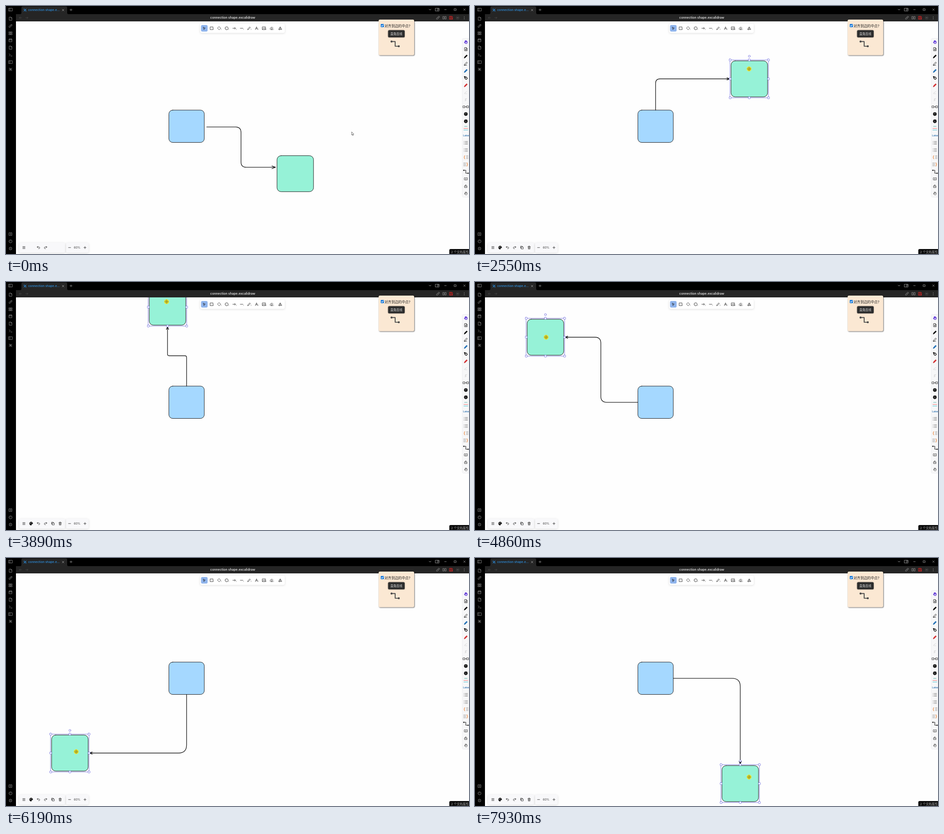
Recreate the animation shown at these times as an HTML page. Size 1022 by 548 pixels, loop 8 s.

```html
<!DOCTYPE html>
<html lang="zh">
<head>
<meta charset="utf-8">
<title>Connection shape</title>
<style>
html, body { margin: 0; width: 100%; height: 100%; overflow: hidden; background: #fefefe; }
svg { display: block; width: 1022px; height: 548px; }
text { font-family: Inter, "Noto Sans CJK SC", "Noto Sans CJK", sans-serif; }
.float { filter: drop-shadow(0 1px 2px #0002); }
</style>
</head>
<body>
<svg viewBox="0 0 1022 548" fill="none" stroke-linecap="round" stroke-linejoin="round">
  <rect width="1022" height="548" fill="#fefefe"/>
  <rect x="359.5" y="230" width="78.2" height="71.5" rx="8.5" fill="#a5d8ff" stroke="#1e1e1e"/>
  <rect id="target" x="-40.3" y="-39.8" width="80.6" height="79.6" rx="9" fill="#96f2d7" stroke="#1e1e1e"/>
  <path id="arrow" stroke="#1e1e1e" stroke-width="1.35"/>
  <g id="selection" stroke="#6965db" stroke-width=".8"></g>
  <g id="grab">
    <circle r="5.4" fill="#e9e63a"/>
    <path d="M0-4L4 0 0 4-4 0ZM-2-2 2 2M2-2-2 2M0-3V3M-3 0H3" stroke="#8f8c22" stroke-width=".8"/>
  </g>
  <path id="pointer" d="M0 0V6.6L1.5 5.3 2.5 7.7 3.6 7.2 2.6 4.9 4.5 4.7Z" fill="#fff" stroke="#333" stroke-width=".7"/>
  <g id="ui"></g>
  <g id="extras"></g>
</svg>
<script>
const $ = id => document.getElementById(id);
const box = (x, y, w, h, fill, r = 0, more = '') =>
  `<rect x="${x}" y="${y}" width="${w}" height="${h}" rx="${r}" fill="${fill}" ${more}/>`;
const icon = (x, y, d, color = '#333', width = .9, fill = 'none') =>
  `<path transform="translate(${x} ${y})" d="${d}" stroke="${color}" stroke-width="${width}" fill="${fill}"/>`;
const label = (x, y, size, fill, text, more = '') =>
  `<text x="${x}" y="${y}" font-size="${size}" fill="${fill}" ${more}>${text}</text>`;
const row = (list, draw) => list.map(draw).join('');

const D = {
  circle: 'M-3.4 0A3.4 3.4 0 1 1 3.4 0 3.4 3.4 0 1 1-3.4 0',
  square: 'M-3-3H3V3H-3Z',
  panel: 'M-4-3H4V3H-4ZM-1.5-3V3',
  doc: 'M-2.5-3.5H1L3-1.5V3.5H-2.5ZM1-3.5V-1.5H3',
  grid: 'M-3.2-3H-.6V-.5H-3.2ZM.8-3H3.4V-.5H.8ZM-3.2 1H-.6V3.5H-3.2ZM.8 1H3.4V3.5H.8Z',
  cross: 'M-2-2 2 2M2-2-2 2',
  plus: 'M-2.5 0H2.5M0-2.5V2.5',
  minus: 'M-2.5 0H2.5',
  menu: 'M-2.6-2.2H2.6M-2.6 0H2.6M-2.6 2.2H2.6',
  pen: 'M-3.5 3.5L-2.7 1 1.8-3.4 3.4-1.8-1 2.7Z',
  undo: 'M-1.2-3L-3-1.2-1.2.6M-3-1.2H1A1.8 1.8 0 0 1 1 2.4H0',
  redo: 'M1.2-3L3-1.2 1.2.6M3-1.2H-1A1.8 1.8 0 0 0-1 2.4H0',
  link: 'M-.6.6L1.4-1.4M-1-1L-3 1A1.4 1.4 0 0 0-1 3L.6 1.4M1 1L3-1A1.4 1.4 0 0 0 1-3L-.6-1.4',
  hand: 'M-1.5 1V-2.4M0 0V-3.2M1.5 0V-2.5M3-.8V1.4Q2.6 3.6.6 3.6-1.4 3.4-3.2.6L-1.5 1',
  gear: 'M0-3.2 1-2.4 2.3-2.5 2.4-1 3.3 0 2.4 1 2.3 2.4 1 2.4 0 3.3-1 2.4-2.4 2.4-2.4 1-3.3 0-2.4-1-2.4-2.4-1-2.4Z',
  list: 'M-1.5-3H4M-1.5 0H4M-1.5 3H4M-4-3h.5M-4 0h.5M-4 3h.5',
  spark: 'M-3-3 3 3M3-3-3 3M-3-1 1 3M-1-3 3 1'
};

const frame = () =>
  box(0, 0, 1022, 18, '#000') + box(0, 0, 22, 548, '#000') + box(22, 18, 1000, 16, '#252525') +
  '<path d="M31 18Q34 18 34 15V4Q34 1 37 1H132Q135 1 135 4V15Q135 18 138 18Z" fill="#252525"/>' +
  icon(42, 9, D.spark, '#2c86cf', .9) +
  label(49, 11.3, 6.65, '#2c86cf', 'connection shape.e...', 'font-weight="600"') +
  label(500.5, 28.3, 7, '#dcdcdc', 'connection shape.excalidraw', 'font-weight="600" text-anchor="middle"') +
  icon(126, 9, D.cross, '#bbb', .7) + icon(143.5, 8.5, D.plus, '#aaa', .7) +
  icon(10, 8, D.panel, '#999', .8) +
  icon(32, 26, 'M2.5 0H-2.5M-.5-2-2.5 0-.5 2', '#444') + icon(46, 26, 'M-2.5 0H2.5M.5-2 2.5 0 .5 2', '#444') +
  icon(936, 8, 'M-2-1 0 1 2-1', '#aaa') + icon(952, 8, 'M-4-3H4V3H-4ZM1-3V3M1-1H4', '#aaa', .8) +
  icon(970, 8, 'M-2 0H2', '#aaa', .8) + icon(991.5, 8, 'M-2-2H2V2H-2Z', '#aaa', .8) + icon(1012, 8, D.cross, '#aaa', .7) +
  icon(953.5, 26, D.link, '#999', .8) +
  icon(968, 26, 'M-3.5-2.8H-1V2.8H-3.5ZM1-2.8H3.5V2.8H1Z', '#999', .8) +
  icon(982.5, 26, 'M-3.2-3.2H2L3.2-2V3.2H-3.2ZM-1.5-3V-1H1.5V-3M-2 3V1H2V3', '#c22', 1) +
  icon(997, 26, D.circle, '#444', .8) + icon(997, 26, 'M-1 0H1', '#555', 2) +
  icon(1011.5, 26, 'M0-2.5V-2.4M0 0V.1M0 2.5V2.6', '#bbb', 1.2) +
  row([['doc', 28], ['link', 44], ['grid', 60], ['square', 76], ['doc', 92], [0, 108], ['panel', 124], ['spark', 140],
       ['square', 504], ['circle', 520], ['gear', 536]],
    ([k, y]) => icon(10, y, k ? D[k] : 'M-3-2.5-.5 0-3 2.5M.5 2.5H3.5', '#929292', .8)) +
  icon(10, 76, 'M-3-1.2H3M-1.5-4V-3M1.5-4V-3', '#929292', .8) +
  label(8.6, 506, 5, '#929292', '8') + label(8.6, 521.9, 5, '#929292', '?') + icon(10, 536, 'M-.8 0H.8', '#929292', 1);

const toolShapes = ['M-1.8-2.4 2.4-.3.4.4-.3 2.6Z', D.square, 'M0-3.5L3.5 0 0 3.5-3.5 0Z', D.circle,
  'M-3 0H3M1-2 3 0 1 2', 'M-3 0H3', 'M-3 3L-2.3.8 1.6-3 3-1.6-.8 2.3Z', 'M-2.6 3L-.2-3H.2L2.6 3M-1.6.8H1.6',
  'M-3.4-3H3.4V3H-3.4ZM-3 2L-.8-.4 1 1.4 2 .5 3.2 1.8M1.4-1.2h.1', 'M-3.2 1L.8-3 3.2-.6-.4 3H-1.4ZM-.4 3H3M-1.2-1 1.2 1.4',
  'M0-3L1.5-.6H-1.5ZM-3 1H-.6V3.2H-3ZM.8 2A1.2 1.2 0 1 1 3.2 2 1.2 1.2 0 1 1 .8 2'];
const toolbar = () =>
  box(428.5, 39, 187, 20.5, '#fff', 4, 'class="float"') + box(430.5, 42, 14.5, 14.5, '#8fb4ec', 3) +
  row(toolShapes, (d, i) => {
    const x = i < 10 ? 437.5 + 16.5 * i : 605.5;
    const mark = i && i < 10 ? label(x + 3.4, 53, 3.2, '#777', i % 10) : '';
    return icon(x, 49.2, d, '#262626', .85) + mark;
  });

const note = () =>
  box(822.5, 30, 78.5, 78.7, '#fbe8d3', 3, 'style="filter:drop-shadow(1px 1px 1.2px #0009)"') +
  box(827.2, 39.8, 7, 7, '#0b74dc', 1.2) + icon(830.7, 43.4, 'M-2 0-.6 1.5 2-1.6', '#fff', 1.1) +
  label(835.5, 46.8, 7.6, '#222', '对齐到边的中点?') +
  box(843.5, 53.5, 36.5, 15.8, '#2d2d2d', 2.6, 'style="filter:drop-shadow(0 .5px .8px #0008)"') +
  label(861.6, 64, 6.6, '#dcdcdc', '直角连线', 'text-anchor="middle"') +
  icon(859, 83.7, 'M-8-5.2H0V5.2H8', '#4a4a4a', 1.9) +
  '<circle cx="851" cy="78.5" r="2.2" fill="#4a4a4a"/><circle cx="867" cy="88.9" r="2.2" fill="#4a4a4a"/>';

const brace = 'M-2-3.5Q-3.5-3.5-3.2-1.6-3 0-4 0-3 0-3.2 1.6-3.5 3.5-2 3.5';
const sideIcons = [
  [D.hand, '#6741d9', 1.5], [D.doc + 'M-1.2 1H1.6M.2-.4V2.4', '#222', .9], [D.pen, '#111', 1, '#111'],
  [D.pen + 'M-3.5 3.8H2', '#222', .9], [D.pen, '#2571b5', 1, '#2571b5'],
  ['M-3.5-3.5 1.5-2 3.5 1 1 3.3-2 1.5ZM-3.5-3.5 0 0M1 3.3 3.5 1', '#111', 1.2],
  [D.pen, '#c2242b', .8, '#d33'], ['M-3 3L-2 1 2-2M-1 3H2', '#ccc', .8], ['M2-2Q-3-2-1 0 3 2-2 2.5', '#bbb', .8],
  ['M-6-2H-2V2H-6ZM2-2H6V2H2ZM-2 0H2', '#333', .9], [D.gear + 'M-1 0H1', '#111', 2], [D.gear + 'M-1 0H1', '#111', 2],
  ['M-4.5 0H4.5', '#e66', .9], null, [D.list, '#666', .9], [D.list, '#777', .9],
  [brace, '#e8833a', 1.1], ['M2-3.5Q3.5-3.5 3.2-1.6 3 0 4 0 3 0 3.2 1.6 3.5 3.5 2 3.5', '#e8833a', 1.1],
  ['M-5-3H0V3.5H5', '#222', 1.1], ['M0-1.8Q-2-3-3.5-2.3V2.3Q-2 1.7 0 2.7 2 1.7 3.5 2.3V-2.3Q2-3 0-1.8V2.7', '#333', .8],
  ['M-2.5-.3H2.5V3.3H-2.5ZM-1.4-.3V-2Q0-4.4 1.4-2M0 1.3h.1', '#333', .9], [D.hand, '#333', .8]];
const sidePanel = () =>
  box(1007, 71.5, 20, 351, '#f7f7f8', 3, 'stroke="#ececf0" stroke-width=".8"') +
  row(sideIcons, (s, i) => s ? icon(1015, 79.5 + 15.92 * i, ...s) : label(1009, 288.4, 5.2, '#2b6fae', 'Latex', 'font-weight="600"')) +
  icon(1015, 270, 'M-3-4H3', '#4a9', .9) + icon(1015, 270, 'M-4.5 4H4.5', '#29b6c9', .9) +
  icon(1017, 334, 'M-1-3H3M-1 0H3M-1 3H3', '#777', .8) + icon(1013, 350, 'M-3-3H2M-3 0H2M-3 3H2', '#777', .8) +
  '<circle cx="1010.5" cy="363.1" r="1.4" fill="#222"/><circle cx="1020" cy="369.6" r="1.4" fill="#222"/>';

const footer = () =>
  box(28.5, 523, 102.5, 22, '#f8f8fa', 4, 'class="float"') + box(132.5, 523, 50, 22, '#f8f8fa', 4, 'class="float"') +
  row([['menu', 39.5], ['undo', 71.7], ['redo', 87.3], ['minus', 140.3], ['plus', 174.3]],
    ([k, x]) => icon(x, 533.8, D[k], '#333', .9)) +
  label(157, 536.2, 6.6, '#444', '60%', 'text-anchor="middle"') +
  '<path d="M978.5 548V540Q978.5 537 981.5 537H1022V548Z" fill="#0a0a0a"/>' +
  label(982.5, 545.6, 6.6, '#aaa', '2 个文档属性');

$('ui').innerHTML = frame() + toolbar() + note() + sidePanel() + footer();
$('extras').innerHTML =
  icon(55.5, 533.8, 'M0-3.6A3.6 3.6 0 0 0 0 3.6Q1.4 3.4.6 1.8.6.8 2 .9 3.6 1 3.6-.4 3.2-3.4 0-3.6Z', '#111', .8, '#111') +
  icon(55.5, 533.8, 'M-1.9-.2V-.1M-.8-1.9V-1.8M1.4-1.8V-1.7', '#fff', 1.1) +
  icon(103.5, 533.8, 'M-1.2-1.2H3V3H-1.2ZM-1.2 1H-3V-3H1V-1.2', '#333', .9) +
  icon(119.5, 533.8, 'M-2.8-2H2.8M-2.2-2-1.8 3.3H1.8L2.2-2M-1-2V-3.3H1V-2M-.7-.4V1.8M.7-.4V1.8', '#333', .8);
$('selection').innerHTML = box(-42.3, -41.8, 84.6, 83.6, 'none') +
  row([-1, 0, 1], i => row([-1, 0, 1], j => i || j
    ? box(i * 42.3 - 2.2, j * 41.8 - 2.2, 4.4, 4.4, '#fff', 1) : '')) +
  '<circle cy="-50" r="2.2" fill="#fff"/>';

// Drag keys: step, centre x and y, hand offset x and y.
const keys = [
  [0, 638.5, 370.5, 0, -10], [4, 640, 362, 0, -12], [8, 645.5, 321, 0, -20], [15, 605.5, 161, -.5, -22],
  [17, 574.5, 132, -5, -18], [26, 422.5, 50, -8, -12], [29, 356.5, 55.5, -2, -12], [35, 220.5, 76, -5, -4],
  [39, 155.5, 122, 1.5, 0], [44, 126, 238, 5, 2], [53, 141, 431, 14, -3], [62, 303.5, 497, 25.5, -11],
  [66, 430, 508, 26, -14], [71, 585.5, 498.5, 19.5, -14.5]];
const bursts = [1120, 1990, 2840, 3700, 4580, 5430, 6280, 7150];

function stepAt(t) {
  const i = bursts.findLastIndex(s => t >= s);
  return i * 9 + Math.min(8, Math.floor((t - bursts[i]) / (i ? 93.2 : 97.2)));
}

function pose(n) {
  const i = Math.max(0, Math.min(keys.length - 2, keys.findLastIndex(k => k[0] <= n)));
  const a = keys[i], b = keys[i + 1], before = keys[i - 1] || a, after = keys[i + 2] || b;
  const h = b[0] - a[0], u = (n - a[0]) / h, v = 1 - u;
  return [1, 2, 3, 4].map(k => {
    const m0 = (b[k] - before[k]) / (b[0] - before[0]) * h;
    const m1 = (after[k] - a[k]) / (after[0] - a[0]) * h;
    return a[k] * v * v * (1 + 2 * u) + m0 * u * v * v + b[k] * u * u * (3 - 2 * u) - m1 * u * u * v;
  });
}

const distance = (p, q) => Math.hypot(q[0] - p[0], q[1] - p[1]);
const toward = (p, q, r) => {
  const d = distance(p, q) || 1;
  return [p[0] + (q[0] - p[0]) * r / d, p[1] + (q[1] - p[1]) * r / d];
};

function arrowPath(points, head) {
  const shortest = Math.min(...points.slice(1).map((p, i) => distance(points[i], p)));
  const r = Math.min(18, shortest ** 2 / 480, shortest / 2);
  const end = points.at(-1), last = points.at(-2);
  let d = 'M' + points[0];
  for (let i = 1; i < points.length - 1; i++) {
    const p = points[i];
    d += `L${toward(p, points[i - 1], r)}Q${p} ${toward(p, points[i + 1], r)}`;
  }
  const [bx, by] = toward(end, last, head);
  const nx = (by - end[1]) * .38, ny = (end[0] - bx) * .38;
  return `${d}L${end}M${bx + nx},${by + ny}L${end}L${bx - nx},${by - ny}`;
}

// Around the fixed box each quarter turn has a three-part route, then a single elbow.
function route(cx, cy) {
  const ox = 398.6, oy = 265.8, dx = cx - ox, dy = cy - oy;
  const angle = (Math.atan2(dy, dx) * 180 / Math.PI + 380) % 360;
  const side = Math.floor(angle / 90), elbow = angle % 90 > 65;
  const flat = side % 2 === 0, sign = side < 2 ? 1 : -1;
  const at = (along, across) => flat ? [along, across] : [across, along];
  const [a0, c0, a1, c1] = flat ? [ox, oy, cx, cy] : [oy, ox, cy, cx];
  const start = a0 + sign * (flat ? 39 : 35.7);
  if (elbow) return [at(start, c0), at(a1, c0), at(a1, c1 - Math.sign(c1 - c0) * 43)];
  const edge = a1 - sign * 40.4, mid = (start + edge) / 2;
  return [at(start, c0), at(mid, c0), at(mid, c1), at(edge - sign * 2.5, c1)];
}

const place = (id, x, y) => $(id).setAttribute('transform', `translate(${x} ${y})`);
const show = (id, on) => $(id).setAttribute('visibility', on ? 'visible' : 'hidden');

function draw(t) {
  const dragging = t >= bursts[0];
  const [x, y, hx, hy] = pose(dragging ? stepAt(t) : 0);
  place('target', x, y);
  place('selection', x, y);
  place('grab', x + hx, y + hy);
  const [px, py] = t < 100 ? [763, 278.5] : t < 160 ? [763, 275] : t < 350 ? [763, 272.5] : t < 450 ? [765, 250] : [766, 234.5];
  place('pointer', px, py);
  const rest = [[443, 267.3], [518.7, 267.3], [518.7, 356.4], [595, 356.4]];
  $('arrow').setAttribute('d', arrowPath(dragging ? route(x, y) : rest, dragging ? 6.5 : 8));
  for (const id of ['selection', 'grab', 'extras']) show(id, dragging);
  show('pointer', !dragging);
}

const begin = performance.now();
function tick() {
  draw((performance.now() - begin) % 8000);
  requestAnimationFrame(tick);
}
tick();
</script>
</body>
</html>
```
